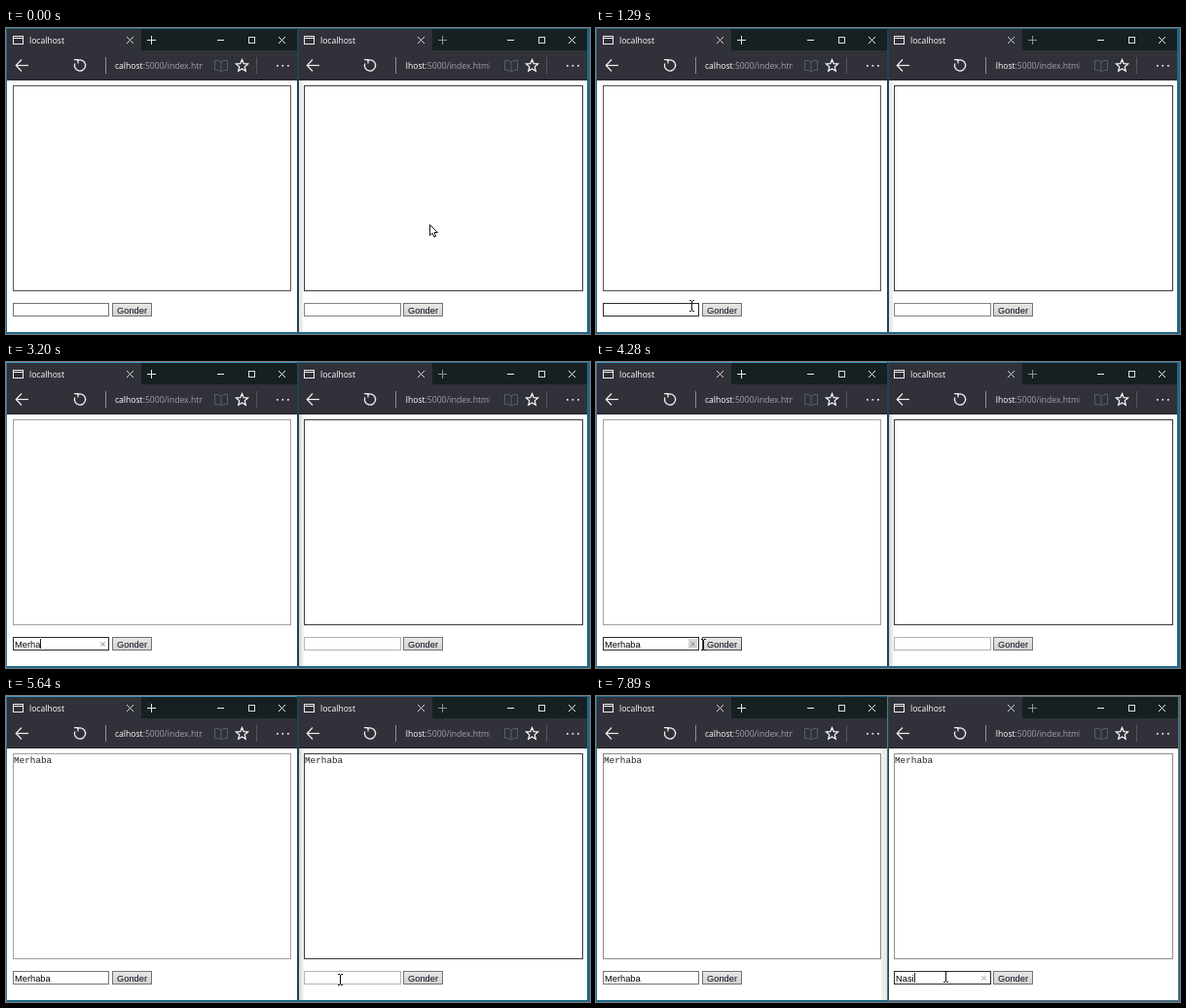
Write an HTML page with a canvas that moves like this. It is 600 px wide and 315 px high and loops after 7.99 s.

```html
<!DOCTYPE html>
<html lang="tr">
<head>
<meta charset="utf-8">
<title>localhost</title>
<style>
html, body { margin: 0; width: 100%; height: 100%; overflow: hidden; background: #fff; }
canvas { display: block; width: 600px; height: 315px; }
</style>
</head>
<body>
<canvas id="stage" width="600" height="315"></canvas>
<script>
const ctx = document.getElementById('stage').getContext('2d');
const LOOP = 7990;
const UI = '"Open Sans", "Noto Sans", sans-serif';
const ARIAL = '"Liberation Sans", Arial, sans-serif';
const MONO = '"Liberation Mono", "Courier New", monospace';
const INK = '#f0f0f0', TEAL = '#226886';

const LEFT_ACTIVE = 1610, PRESS = 4640, SENT = 4700, RIGHT_ACTIVE = 5710;
const LEFT_KEYS = Array.from('Merhaba', (c, i) => 2540 + i * 136);
const RIGHT_KEYS = Array.from('Nasi', (c, i) => i ? 7710 + i * 60 : 6630);

// The pointer rests between moves
const START = { x: 435, y: 202 };
const MOVES = [
  { from: 130, to: 900, x: 205, y: 255 },
  { from: 930, to: 1350, x: 77, y: 292 },
  { from: 3820, to: 4580, x: 138, y: 290 },
  { from: 4790, to: 5430, x: 295, y: 300 },
  { from: 5460, to: 5690, x: 359, y: 289 }
];

function pointer(t) {
  let { x, y } = START;
  for (const m of MOVES) {
    const k = Math.min(1, Math.max(0, (t - m.from) / (m.to - m.from))) ** 1.2;
    x += (m.x - x) * k;
    y += (m.y - y) * k;
  }
  return [Math.round(x), Math.round(y)];
}

function fill(x, y, w, h, color) {
  ctx.fillStyle = color;
  ctx.fillRect(x, y, w, h);
}

function box(x, y, w, h, color) {
  ctx.strokeStyle = color;
  ctx.lineWidth = 1;
  ctx.strokeRect(x + .5, y + .5, w - 1, h - 1);
}

function line(points, color, width = 1, closed = false) {
  ctx.beginPath();
  points.forEach(([x, y]) => ctx.lineTo(x, y));
  if (closed) ctx.closePath();
  ctx.strokeStyle = color;
  ctx.lineWidth = width;
  ctx.stroke();
}

function text(s, x, y, size, family, color) {
  ctx.font = size + 'px ' + family;
  ctx.fillStyle = color;
  ctx.fillText(s, x, y);
  return ctx.measureText(s).width;
}

function cross(x, y, r, color) {
  line([[x - r, y - r], [x + r, y + r]], color);
  line([[x + r, y - r], [x - r, y + r]], color);
}

function address(host, x, from, to) {
  ctx.save();
  ctx.beginPath();
  ctx.rect(from, 28, to - from, 20);
  ctx.clip();
  const w = text(host, x, 41.5, 8.6, UI, '#fff');
  text(':5000/index.html', x + w, 41.5, 8.6, UI, '#a2a3a8');
  ctx.restore();
}

function star(cx, cy, r) {
  const points = [];
  for (let i = 0; i < 10; i++) {
    const a = i * Math.PI / 5 - Math.PI / 2, d = i % 2 ? r * .45 : r;
    points.push([cx + d * Math.cos(a), cy + d * Math.sin(a)]);
  }
  line(points, '#fff', 1.2, true);
}

function book(x, y) {
  const color = '#526068';
  for (const side of [-1, 1]) {
    line([[x, y - 4], [x + 3 * side, y - 5.5], [x + 6.5 * side, y - 5.5],
      [x + 6.5 * side, y + 4.5], [x + 3 * side, y + 4.5], [x, y + 6]], color);
  }
  line([[x, y - 4], [x, y + 6]], color);
}

function chrome(plus, shift) {
  fill(1, 1, 298, 22, '#172021');
  fill(1, 1, 138, 22, '#303139');
  fill(1, 23, 298, 31, '#303139');
  fill(1, 53, 298, 1, '#22232a');

  box(7, 8, 11, 9, INK);
  fill(7, 10, 11, 1, INK);
  text('localhost', 24, 16, 8.6, UI, '#fff');
  cross(127.5, 12.5, 3.5, '#d8d8d8');
  fill(145, 12, 9, 1, plus);
  fill(149, 8, 1, 9, plus);
  line([[23, 38.5], [10.5, 38.5]], INK, 1.2);
  line([[16, 32.5], [10.3, 38.5], [16, 44.5]], INK, 1.2);

  ctx.save();
  ctx.translate(shift, 0);
  fill(217, 12, 7, 1, INK);
  box(249, 9, 7, 7, '#dcdcdc');
  cross(283.5, 12.5, 3.5, INK);
  ctx.beginPath();
  ctx.arc(76, 38.5, 5.6, -2.1, 3.5);
  ctx.lineWidth = 1.3;
  ctx.stroke();
  line([[70, 32.6], [74, 32.6], [74, 36.5]], INK, 1.2);
  fill(102, 30, 1, 17, '#8d8e94');
  fill(257, 30, 1, 17, '#55565e');
  book(221, 39);
  star(242.5, 39, 6.4);
  for (let i = 0; i < 3; i++) fill(278 + i * 5.5, 38, 1.7, 1.7, INK);
  ctx.restore();
}

function typed(word, keys, t) {
  return word.slice(0, keys.filter(k => t >= k).length);
}

// Solid for half a second, then a short fade, then off
function caretAlpha(t, start, keys) {
  const last = Math.max(start, ...keys.filter(k => t >= k));
  const p = (t - last) % 980;
  return p < 500 ? 1 : Math.max(0, 1 - (p - 500) / 220);
}

function field(f, width) {
  fill(7, 283, width, 14, '#fff');
  box(7, 283, width, 14, f.edge);
  const w = text(f.value, 9, 293.6, 9.3, ARIAL, '#000');
  if (f.caret > 0) {
    ctx.globalAlpha = f.caret;
    fill(Math.round(9 + w), 285, 1, 10, '#222');
    ctx.globalAlpha = 1;
  }
  if (f.clear) {
    if (f.clearHover) fill(95, 285, 9, 10, '#d6d6d6');
    cross(99.5, 290.5, 2, f.clear);
  }
}

function button(hover, pressed) {
  const g = ctx.createLinearGradient(0, 283, 0, 297);
  g.addColorStop(0, pressed ? '#d0d0d0' : '#ebe9e7');
  g.addColorStop(1, pressed ? '#c4c4c4' : '#d2d0cd');
  fill(109, 283, 41, 14, g);
  box(109, 283, 41, 14, hover ? '#505050' : '#747474');
  text('Gonder', 114, 293.5, 9.3, ARIAL, '#0a0a20');
}

function shadow(x0, x1, from, to) {
  const g = ctx.createLinearGradient(x0, 0, x1, 0);
  g.addColorStop(0, from);
  g.addColorStop(1, to);
  fill(Math.min(x0, x1), 54, Math.abs(x1 - x0), 259, g);
}

// extra: how much wider the boxes are in this window
function page(o, extra) {
  fill(1, 54, 298, 259, '#fff');
  if (o.shade) shadow(...o.shade);
  fill(7, 59, 286 + extra, 212, '#fff');
  box(7, 59, 286 + extra, 212, o.area);
  text(o.message, 8, 69, 9.33, MONO, '#222');
  field(o.field, 99 + extra);
  button(o.hover, o.pressed);
}

function ibeam(x, y) {
  fill(x, y - 5, 1, 10, '#111');
  for (const dy of [-6, 5]) {
    fill(x - 2, y + dy, 2, 1, '#111');
    fill(x + 1, y + dy, 2, 1, '#111');
  }
}

function arrow(x, y) {
  ctx.save();
  ctx.translate(x, y);
  ctx.fillStyle = '#fff';
  const shape = new Path2D('M.5 .5v11l2.6-2.3 1.8 3.9 1.8-.8-1.7-3.8h3.3z');
  ctx.fill(shape);
  ctx.strokeStyle = '#111';
  ctx.lineWidth = 1;
  ctx.stroke(shape);
  ctx.restore();
}

function frames(leftOn, rightOn) {
  fill(299, 0, 2, 315, '#1d4455');
  fill(598, 0, 2, 315, TEAL);
  fill(0, 313, 600, 2, TEAL);
  fill(0, 0, 1, 315, leftOn ? '#3c6fa0' : TEAL);
  fill(0, 0, 299, 1, leftOn ? '#3a9cc8' : TEAL);
  fill(300, 0, 298, 1, TEAL);
  if (rightOn) box(299, 0, 300, 314, '#687078');
  else fill(597, 0, 1, 315, TEAL);
}

function draw(t) {
  const [px, py] = pointer(t);
  const inside = (x, y, w, h) => px >= x && px < x + w && py >= y && py < y + h;
  const rightOn = t >= RIGHT_ACTIVE;
  const leftOn = t >= LEFT_ACTIVE && !rightOn;
  const leftFocus = leftOn && t < PRESS;
  const message = t >= SENT ? 'Merhaba' : '';
  const leftValue = typed('Merhaba', LEFT_KEYS, t);
  const rightValue = typed('Nasi', RIGHT_KEYS, t);

  fill(0, 0, 600, 315, TEAL);
  chrome('#e8e8e8', 0);
  address('calhost', 112, 112, 202);
  page({
    area: leftOn ? '#a0a0a0' : rightOn ? '#8a8a8a' : '#55554f',
    message,
    shade: rightOn && [299, 293, '#e6e6e6', '#f2f2ee'],
    field: {
      value: leftValue,
      edge: leftFocus || inside(7, 283, 99, 14) ? '#2c2c2c' : '#747474',
      caret: leftFocus ? caretAlpha(t, 1490, LEFT_KEYS) : 0,
      clear: leftFocus && leftValue && '#777',
      clearHover: inside(95, 283, 17, 14)
    },
    hover: inside(109, 283, 41, 14),
    pressed: t >= PRESS && t < PRESS + 100
  }, 0);

  ctx.save();
  ctx.translate(299, 0);
  chrome('#8b9494', -1);
  address('alhost', 107, 111, 198);
  page({
    area: t >= 5890 ? '#8f8f8f' : '#3a3a38',
    message,
    shade: !rightOn && (leftOn ? [1, 7, '#c9c9c9', '#fafafa'] : [1, 6, '#e4e4e4', '#eeeeee']),
    field: {
      value: rightValue,
      edge: rightOn ? '#2c2c2c' : leftOn ? '#b4b4b4' : '#858585',
      caret: rightOn ? caretAlpha(t, RIGHT_ACTIVE, RIGHT_KEYS) : 0,
      clear: rightValue && '#a08c7c'
    }
  }, 1);
  ctx.restore();
  frames(leftOn, rightOn);

  // Hidden while typing
  if (t >= LEFT_KEYS[0] && t < 3820) return;
  const overText = inside(7, 59, 286, 212) || inside(306, 59, 287, 212) ||
    inside(7, 283, 105, 14) || inside(306, 283, 100, 14);
  if (t >= 130 && overText) ibeam(px, py);
  else arrow(px, py);
}

const began = performance.now();
function tick() {
  draw((performance.now() - began) % LOOP);
  requestAnimationFrame(tick);
}
tick();
</script>
</body>
</html>
```
